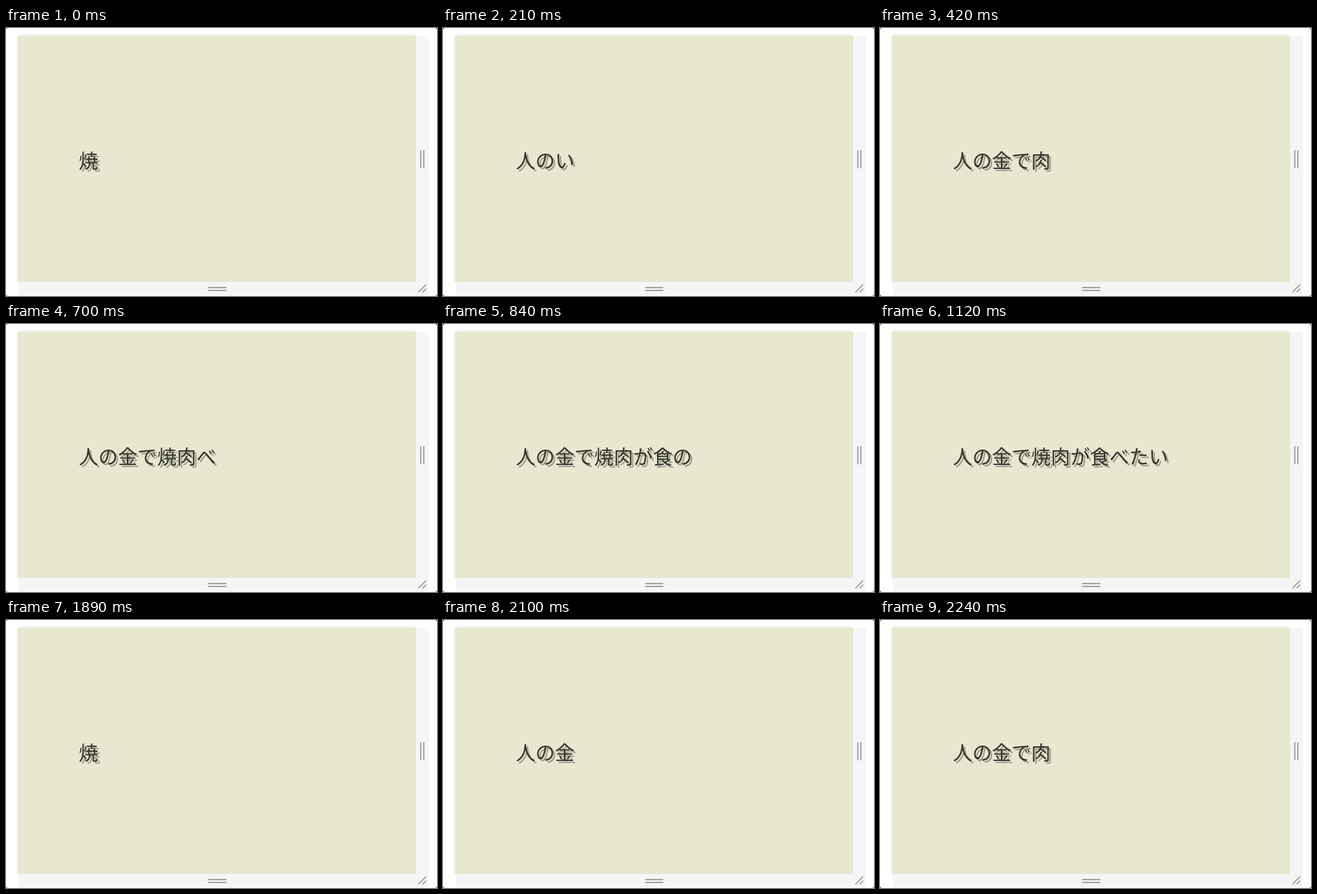
Write an HTML page that moves like this. It is 616x384 px and loops after 2.31 s.

```html
<!DOCTYPE html>
<html lang="ja">
<head>
<meta charset="utf-8">
<style>
  html, body { margin: 0; width: 100%; height: 100%; overflow: hidden; background: #fff; }
  svg { display: block; }
  text { font: 300 28px "Noto Sans CJK JP", "Noto Sans CJK", sans-serif; fill: #33332b; text-shadow: 3px 3px 0 rgba(0, 0, 0, .3); }
</style>
</head>
<body>
<svg width="616" height="384" viewBox="0 0 616 384">
  <path d="M0 0h2L0 2zM616 0h-2l2 2zM0 384h2l-2-2zM616 384h-2l2-2z" fill="#555"/>
  <path d="M15 364V16Q15 8 28 8H583V12H604V383H18V364z" fill="#f5f5f5"/>
  <rect x="17" y="11" width="569" height="353" fill="#e8e8d0"/>
  <path d="M592.8 175v26M597.2 175v26M289 371.8h26M289 376.2h26M589.5 378.5l11-11M595.5 378.5l5-5" stroke="#999" stroke-width="1.7"/>
  <text id="line" x="104" y="201"></text>
</svg>
<script>
const message = '人の金で焼肉が食べたい';
const decoys = '焼がい食肉たべ人の金で';
const tick = 70, loop = 2310, restart = 1890;
// Each character takes two stages: a decoy, then the real one.
const firstRun = [0, 1, 3, 4, 5, 7, 8, 9, 10, 11, 12, 14, 16, 17, 18, 20, 21];
const secondRun = [0, 2, 3, 5, 7, 8];
const line = document.getElementById('line');

function textAt(time) {
  const again = time >= restart;
  const stages = again ? secondRun : firstRun;
  const step = Math.floor((again ? time - restart : time) / tick);
  const stage = stages[Math.min(step, stages.length - 1)];
  const done = (stage + 1) >> 1;
  return message.slice(0, done) + (stage % 2 ? '' : decoys[done]);
}

function draw() {
  line.textContent = textAt(performance.now() % loop);
  requestAnimationFrame(draw);
}
draw();
</script>
</body>
</html>
```
